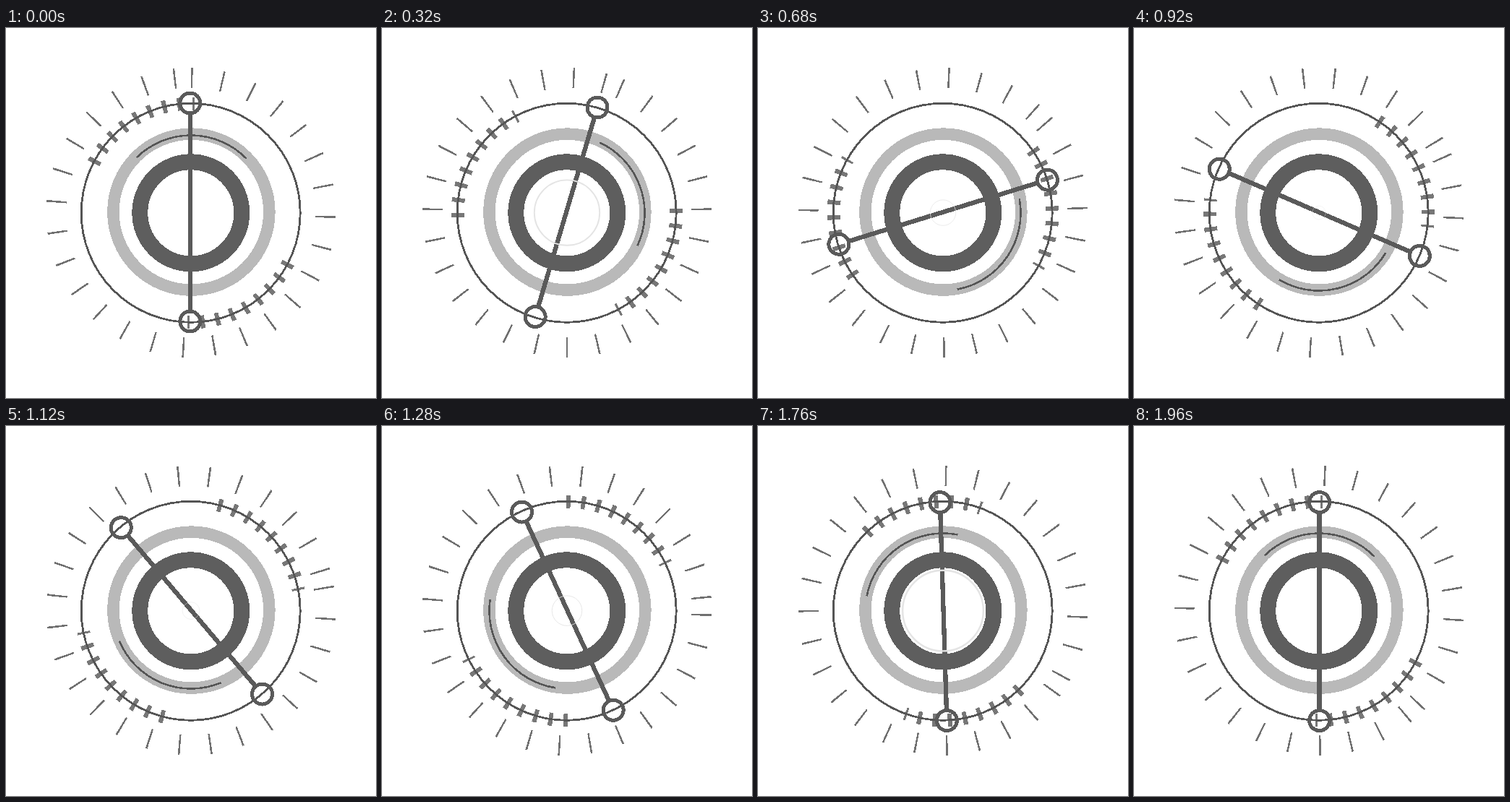
These frames come from a looping animation (512x512 px, 2 s). An HTML page:

```html
<!DOCTYPE html>
<html lang="en">
<head>
<meta charset="utf-8">
<title>Rotating dial</title>
<style>
  html, body { margin: 0; width: 100%; height: 100%; overflow: hidden; background: #fff; }
  svg { display: block; width: 100vw; height: 100vh; shape-rendering: crispEdges; }
  svg * { fill: none; }
  #pulse { shape-rendering: auto; }
</style>
</head>
<body>
<svg viewBox="0 0 512 512">
  <circle cx="256.4" cy="254.6" r="108" stroke="#b9b9b9" stroke-width="16.5"/>
  <g transform="translate(256 255.5)">
    <circle id="rays" r="186.5" stroke="#707070" stroke-width="28" stroke-dasharray="2.5 40"/>
  </g>
  <g transform="translate(256 256)">
    <g id="marks" stroke="#777" stroke-width="18" stroke-dasharray="6 15">
      <path id="markArc"/>
      <path id="markArcOpposite" transform="rotate(180)"/>
    </g>
    <circle cx="-.3" cy="-.2" r="151.5" stroke="#555" stroke-width="2.8"/>
    <path id="sweep" stroke="#555" stroke-width="2.6"/>
  </g>
  <g id="hand" stroke="#5a5a5a">
    <path d="M-.9 -136.8V135.2" stroke-width="6.3"/>
    <circle cx="-.9" cy="-151.8" r="14" stroke-width="5"/>
    <circle cx="-.9" cy="150.2" r="14" stroke-width="5"/>
  </g>
  <circle id="pulse" cx="256" cy="255.6" stroke="#e4e4e4"/>
  <circle cx="255.8" cy="255.8" r="70.5" stroke="#5e5e5e" stroke-width="22"/>
</svg>
<script>
const LOOP = 2000, STEP = 40, SPAN = LOOP - STEP;
const $ = id => document.getElementById(id);
const rotate = (id, angle) => $(id).setAttribute('transform', `rotate(${angle})`);

// Point at an angle measured clockwise from the top.
function polar(radius, degrees) {
  const a = degrees * Math.PI / 180;
  return `${radius * Math.sin(a)} ${-radius * Math.cos(a)}`;
}

const arc = (radius, from, to) =>
  `M${polar(radius, from)}A${radius} ${radius} 0 0 1 ${polar(radius, to)}`;

// Cubic Bezier easing with flat ends; x1 and x2 are the handle positions.
function ease(x, x1, x2) {
  let low = 0, high = 1;
  for (let i = 0; i < 30; i++) {
    const s = (low + high) / 2, r = 1 - s;
    if (3 * r * r * s * x1 + 3 * r * s * s * x2 + s * s * s < x) low = s;
    else high = s;
  }
  return low * low * (3 - 2 * low);
}

// Smooth curve through [time, value] points.
function spline(points, t) {
  const last = points.length - 1;
  let i = 0;
  while (i < last - 1 && t > points[i + 1][0]) i++;
  const slope = k => {
    const [t0, v0] = points[Math.max(k - 1, 0)];
    const [t1, v1] = points[Math.min(k + 1, last)];
    return (v1 - v0) / (t1 - t0);
  };
  const [t0, v0] = points[i], [t1, v1] = points[i + 1];
  const d = t1 - t0, s = (t - t0) / d, r = 1 - s;
  return v0 * r * r * (1 + 2 * s) + v1 * s * s * (3 - 2 * s)
    + d * s * r * (slope(i) * r - slope(i + 1) * s);
}

const SWEEP = [[0, 0.5], [320, 70], [680, 124.5], [1120, 202.3], [1440, 265.5], [1760, 326], [1960, 360.5]];
const PULSE_MAX = 61.5, PULSE_MIN = 9;

function pulseRadius(p) {
  const shrink = p < 0.5 ? ease(p * 2, 0.29, 0.57) : 1 - ease(p * 2 - 1, 0.333, 0.667);
  return PULSE_MAX + (PULSE_MIN - PULSE_MAX) * shrink;
}

function draw(t) {
  const p = t / SPAN;
  rotate('rays', 140 * p - 90);
  rotate('marks', -180 * p);
  $('hand').setAttribute('transform',
    `translate(255.7 255.8) rotate(${180 * ease(p, 0.333, 0.39)})`);
  const middle = spline(SWEEP, t);
  $('sweep').setAttribute('d', arc(107.5, middle - 45, middle + 45));
  const radius = pulseRadius(p);
  $('pulse').setAttribute('r', radius);
  $('pulse').setAttribute('stroke-width', radius * 0.042);
}

for (const id of ['markArc', 'markArcOpposite']) $(id).setAttribute('d', arc(151.4, -62.9, 1.9));

const start = performance.now();
function tick() {
  const t = (performance.now() - start) % LOOP;
  draw(Math.floor(t / STEP) * STEP);
  requestAnimationFrame(tick);
}
tick();
</script>
</body>
</html>
```
